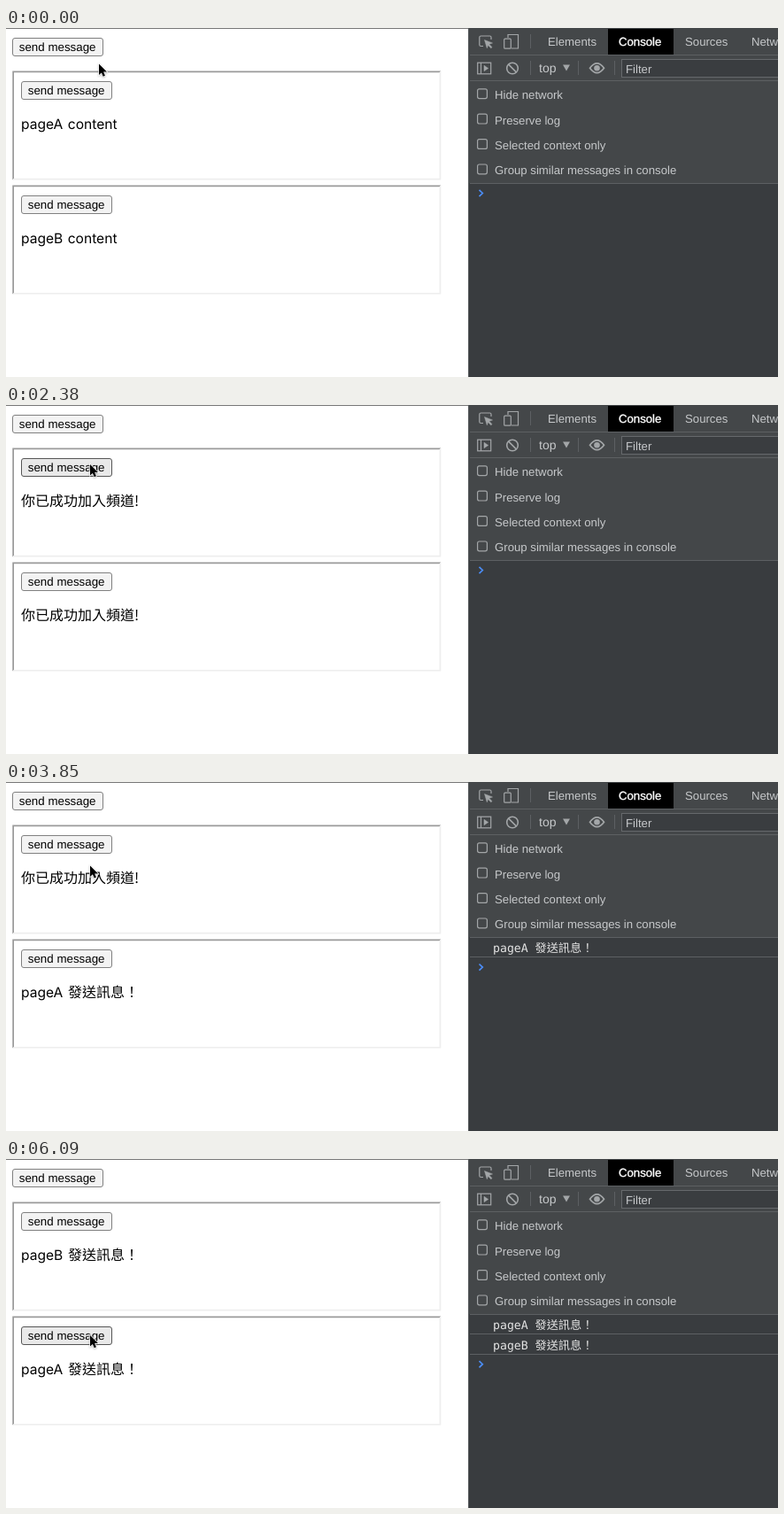
These frames come from a looping animation (872 px wide and 394 px high, 6160 ms). An HTML page:

```html
<!DOCTYPE html>
<html lang="zh-Hant">
<head>
<meta charset="utf-8">
<style>
html, body { margin: 0; width: 100%; height: 100%; overflow: hidden; background: #fff; }
svg { display: block; }
text { white-space: pre; text-rendering: geometricPrecision; }
.ui { font: 13.2px "Liberation Sans", Arial, sans-serif; fill: #c6c8ca; }
.btn { font: 13.333px "Liberation Sans", Arial, sans-serif; }
.page { font: 15.6px Inter, "Noto Sans CJK TC", "Noto Sans CJK", sans-serif; word-spacing: 1px; }
.page .han { font: 16px "Noto Sans CJK TC", "Noto Sans CJK", sans-serif; }
.log { font: 13.2px "DejaVu Sans Mono", monospace; fill: #e4e4e4; }
.log .han { font: 13.2px "Noto Sans CJK TC", "Noto Sans CJK", sans-serif; }
.line { fill: none; stroke: #a3a6a8; stroke-width: 1.2; }
.rule { stroke: #5d6063; }
.arrow { stroke: #fff; stroke-width: 1.5; paint-order: stroke; filter: drop-shadow(0 1px 1px #0004); }
</style>
</head>
<body>
<svg id="stage" width="872" height="394" viewBox="0 0 872 394"></svg>
<script>
const LOOP = 6160, STEP = 70, PRESS = 210;
const clicks = [770, 2660, 4830];
const [joined, sentA, sentB] = clicks.map(t => t + PRESS);
const buttons = [[7.5, 11.5], [17.5, 60.5], [17.5, 189.5]];
// time, x, y of the pointer tip
const path = [
  [0, 105, 40.5], [210, 95, 27], [1820, 95, 27], [2380, 95, 67], [2520, 96, 70],
  [3710, 96, 70], [4200, 91, 193], [4480, 90, 198.5], [6020, 90, 198.5], [6090, 95, 199], [LOOP, 95, 199]
];

const button = ([x, y]) => `<rect class="face" x="${x}" y="${y}" width="102" height="20" rx="2.5"/>
  <text class="btn" x="${x + 7.3}" y="${y + 14.3}">send message</text>`;
const iframe = y => `<g transform="translate(7.3 ${y})">
  <path d="M0 123V0H484L482.3 1.7H1.7V121.3Z" fill="#9a9a9a"/>
  <path d="M484 0V123H0L1.7 121.3H482.3V1.7Z" fill="#eee"/></g>`;
const label = (x, y, s, extra = '') => `<text class="ui" x="${x}" y="${y}" ${extra}>${s}</text>`;
const option = (s, i) => {
  const y = 75.2 + i * 28.4;
  return `<rect class="line" x="532.6" y="${y - 6.4}" width="10.8" height="10.8" rx="2"/>` + label(552, y + 5, s);
};
const message = (from, x, hanX) => `${from}<tspan class="han" x="${hanX}">發送訊息！</tspan>`;
const logRow = (from, y) => `<g class="logRow"><text class="log" x="550" y="${y}">${message(from, 550, 597.5)}</text>
  <path class="rule" d="M524 ${y + 5.5}H872"/></g>`;

const stage = document.getElementById('stage');
stage.innerHTML = `
  <rect width="872" height="394" fill="#fff"/>
  <path d="M0 .5H523" stroke="#777"/>
  ${iframe(48.5)}${iframe(177.6)}
  ${buttons.map(button).join('')}
  <text class="page" x="17" y="114"></text>
  <text class="page" x="17" y="243"></text>

  <rect x="522" width="350" height="394" fill="#393c3f"/>
  <rect x="523" width="349" height="175" fill="#444749"/>
  <path d="M522.5 0V394" stroke="#55585a"/>
  <path class="rule" d="M524 30.5H872M524 59.5H872M524 175.5H872M592.5 7V23M592.5 37V53M646.5 37V53M687.5 37V53"/>
  <rect x="680" y="1" width="74" height="29" fill="#000"/>
  ${label(612, 20, 'Elements')}
  ${label(692, 20, 'Console', 'style="fill:#fff;stroke:#fff;stroke-width:.35"')}
  ${label(767, 20, 'Sources')}
  ${label(842, 20, 'Network')}
  <g class="line">
    <path d="M539 20.5H536.5Q534.8 20.5 534.8 19V10.5Q534.8 9 536.5 9H546.5Q548 9 548 10.5V13"/>
    <path d="M540.5 13.5L549.5 17L545.8 18.2L549 21.7L547.8 22.8L544.5 19.4L543.3 22.8Z" fill="#a3a6a8" stroke-width=".5"/>
    <path d="M567 11V7.5H578.5V23H571"/>
    <rect x="562.7" y="12.2" width="7.6" height="11" rx="1"/>
    <rect x="532.7" y="39.2" width="15" height="12.6"/>
    <path d="M536.5 39V52"/>
    <path d="M540 42.3L544.7 45.5L540 48.7Z" fill="#a3a6a8" stroke-width=".5"/>
    <circle cx="572" cy="45.5" r="6.3" stroke-width="1.6"/>
    <path d="M567.6 41.1L576.4 49.9" stroke-width="1.6"/>
    <path d="M659.5 45.3Q667.5 34.5 675.5 45.3Q667.5 56.1 659.5 45.3Z" stroke-width="1.7"/>
    <circle cx="667.5" cy="45.3" r="2.7" fill="#a3a6a8"/>
  </g>
  ${label(602, 50, 'top', 'style="font-size:14px"')}
  <path d="M629 41.5H637L633 48.5Z" fill="#a3a6a8"/>
  <rect x="695.5" y="35.5" width="190" height="20" fill="#3a3d40" stroke="#66696c"/>
  ${label(700, 51, 'Filter')}
  ${['Hide network', 'Preserve log', 'Selected context only', 'Group similar messages in console'].map(option).join('')}
  ${logRow('pageA', 192)}${logRow('pageB', 215)}
  <path id="prompt" d="M534.5 -3.6L538.3 0L534.5 3.6" fill="none" stroke="#4b8df8" stroke-width="1.7"/>
  <rect id="caret" x="550" y="180" width="1.5" height="14" fill="#ddd"/>

  <g id="pointer">
    <circle id="ring" cx="-1" cy="-.5" r="21.5" fill="none" stroke="#111" stroke-width="1.5"/>
    <path class="arrow" transform="scale(.9)" d="M0 0V14L3.2 11.1L5.2 15.8L7.7 14.7L5.7 10.1H10Z"/>
  </g>`;

const byId = id => document.getElementById(id);
const all = q => [...stage.querySelectorAll(q)];
const faces = all('.face'), pages = all('text.page'), rows = all('.logRow');
const show = (el, on) => el.setAttribute('visibility', on ? 'visible' : 'hidden');

function pointerAt(t) {
  const i = path.findIndex(p => p[0] > t);
  const [t0, x0, y0] = path[i - 1], [t1, x1, y1] = path[i];
  let u = (t - t0) / (t1 - t0);
  if (t1 - t0 > 300) u = u * u * (3 - 2 * u);
  return [x0 + (x1 - x0) * u, y0 + (y1 - y0) * u];
}

function pageText(t, name, other, received) {
  if (t >= received) return message(other, 17, 70);
  return t >= joined ? '<tspan class="han">你已成功加入頻道!</tspan>' : name + ' content';
}

function setPage(el, html) {
  if (el.shown !== html) el.innerHTML = el.shown = html;
}

function draw() {
  const t = Math.floor(performance.now() % LOOP / STEP) * STEP;
  const [x, y] = pointerAt(t);
  const pressed = clicks.some(c => t >= c && t < c + PRESS);

  byId('pointer').setAttribute('transform', `translate(${x} ${y})`);
  show(byId('ring'), pressed);
  show(byId('caret'), t >= 140 && t < clicks[0]);

  buttons.forEach(([bx, by], i) => {
    const over = x >= bx && x <= bx + 102 && y >= by && y <= by + 20;
    const [fill, stroke] = !over ? ['#f3f3f3', '#808080'] : pressed ? ['#fafafa', '#a8a8a8'] : ['#e9e9e9', '#565656'];
    faces[i].setAttribute('fill', fill);
    faces[i].setAttribute('stroke', stroke);
  });

  setPage(pages[0], pageText(t, 'pageA', 'pageB', sentB));
  setPage(pages[1], pageText(t, 'pageB', 'pageA', sentA));
  const count = (t >= sentA) + (t >= sentB);
  rows.forEach((row, i) => show(row, i < count));
  byId('prompt').setAttribute('transform', `translate(0 ${186.5 + count * 22.6})`);
  requestAnimationFrame(draw);
}
draw();
</script>
</body>
</html>
```
